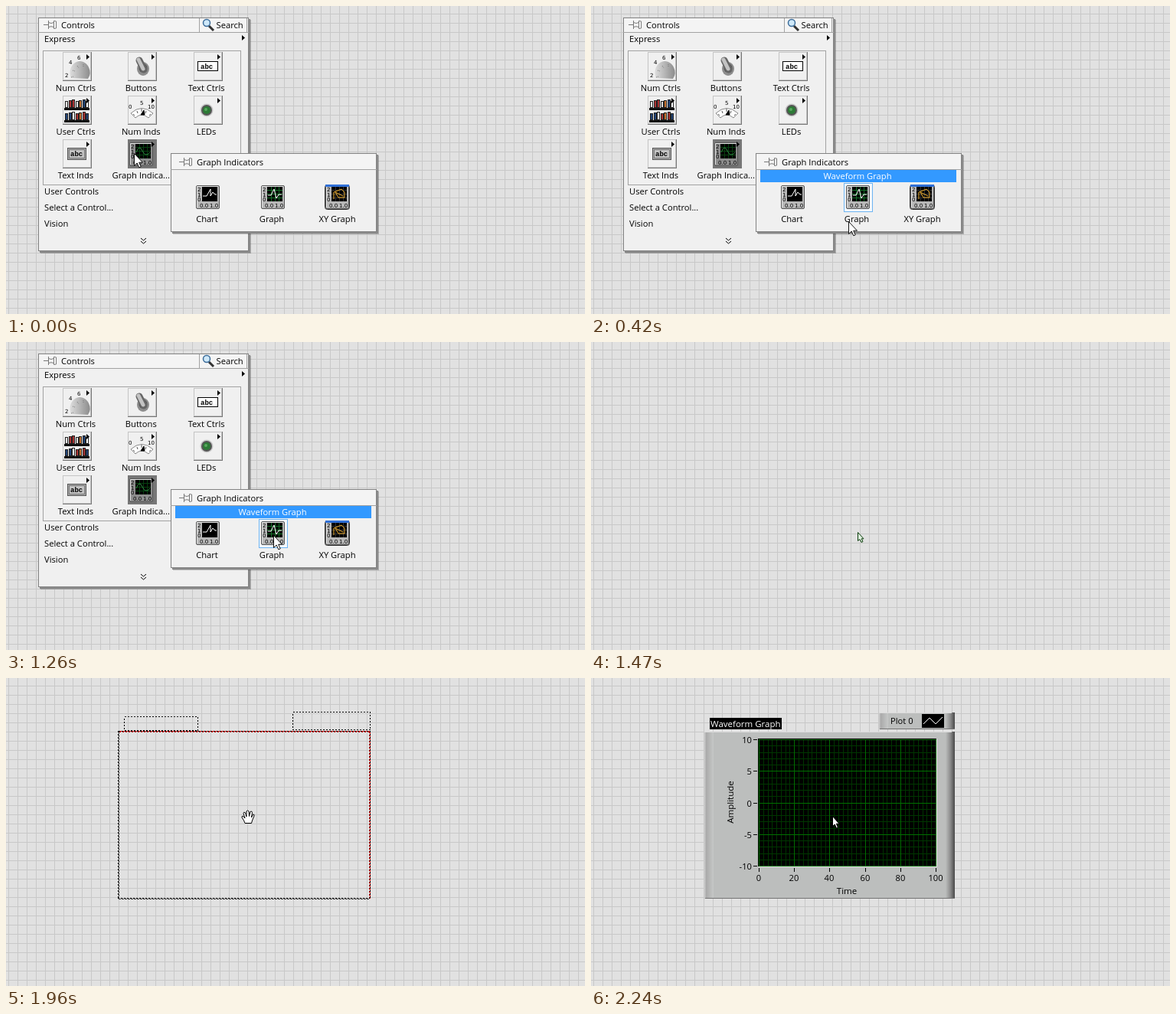
These frames come from a looping animation (756x402 px, 2660 ms). An HTML page:

```html
<!DOCTYPE html>
<html lang="en">
<head>
<meta charset="utf-8">
<title>Placing a waveform graph</title>
<style>
  html, body { margin: 0; width: 100%; height: 100%; overflow: hidden; background: #e1e1e1; }
  svg { display: block; width: 756px; height: 402px; }
  text { font: 11.2px "Open Sans", sans-serif; white-space: pre; }
  .crisp { shape-rendering: crispEdges; }
  .tiny { font: 7px "DejaVu Sans", sans-serif; }
  .mono { font: bold 9px "Liberation Mono", monospace; }
  .axis { font-size: 11.5px; }
</style>
</head>
<body>
<svg id="stage" viewBox="0 0 756 402"></svg>
<script>
const range = n => [...Array(n).keys()];
const rect = (x, y, w, h, fill, extra = '') =>
  `<rect class="crisp" x="${x}" y="${y}" width="${w}" height="${h}" fill="${fill}" ${extra}/>`;
const frame = (x, y, w, h, stroke, fill = 'none') =>
  rect(x + .5, y + .5, w - 1, h - 1, fill, `stroke="${stroke}"`);
const path = (d, stroke = '#000', fill = 'none', extra = '') =>
  `<path d="${d}" stroke="${stroke}" fill="${fill}" ${extra}/>`;
const text = (x, y, s, extra = '') => `<text x="${x}" y="${y}" ${extra}>${s}</text>`;
const mid = (x, y, s, extra = '') => text(x, y, s, `text-anchor="middle" ${extra}`);
const tiny = (x, y, s) => text(x, y, s, 'class="tiny"');
const at = (x, y, body) => `<g transform="translate(${x} ${y})">${body}</g>`;
const layer = (id, body) => `<g id="${id}">${body}</g>`;
const arrowRight = (x, y) => path(`M${x} ${y}v7l4-3.5z`, 'none', '#000');

// Windows and buttons
const panel = (x, y, w, h, sep) =>
  rect(x + 3, y + 3, w, h, '#000', 'opacity=".22"') + rect(x + 2, y + 2, w, h, '#8a8a8a') +
  frame(x, y, w, h, '#828282', '#f0f0f0') +
  rect(x + 1, y + 1, w - 2, sep - 1, '#f4f4f4') + rect(x, y + sep, w, 1, '#a2a2a2');
const pin = (x, y) => at(x, y,
  path('M0 6.5H6M6.5 1V12M6.5 3.5Q10 5.5 13.5 3.5M6.5 9.5Q10 8 13.5 9.5M13.5 1.5L16.5 2V11L13.5 11.5Z', '#777', '#fff'));
const button = (x, y, body) => at(x, y,
  rect(0, 0, 38, 38, '#777') + rect(0, 0, 37, 37, '#c4c4c4') + rect(1, 1, 35, 35, '#f0f0f0') +
  body + arrowRight(31, 3));

// Scope icon: bezel, axis digits, black screen with a trace
const scope = (screen, bezel = '#b8b8b8') =>
  `<rect x=".5" y=".5" width="30" height="30" rx="1.5" fill="${bezel}" stroke="#555"/>` +
  path('M1.5 29V1.5H29', '#e4e4e4') + rect(8, 2, 20, 19, '#000') +
  tiny(2, 8, '2') + tiny(2, 15, '1') + tiny(2, 21, '0') +
  tiny(5, 29, '0.0') + tiny(18, 29, '1.0') + screen;
const mesh = color => path('M13.5 2v19M18.5 2v19M23.5 2v19M8 6.5h20M8 11.5h20M8 16.5h20', color, 'none', 'class="crisp"');

const book = (x, base, h, color, w = 4) => frame(x, base - h, w, h, '#222', color);
const shelf = (base, colors) =>
  colors.map((c, i) => book(3 + i * 4.5, base, 9 + i % 3, c)).join('') + rect(2, base, 33, 3, '#111');

const icons = {
  knob: `<path d="M11 34A13 15 0 0 1 34 20Q38 28 33 35Z" fill="url(#metal)"/>` +
    path('M11 33l3-1M13 24l3 1M19 18l2 3M27 16v3', '#777', 'none', 'stroke-dasharray="1 1"') +
    tiny(3, 33, '2') + tiny(8, 16, '4') + tiny(19, 10, '6'),
  toggle: `<ellipse cx="20" cy="22" rx="8" ry="9" fill="#8d8d8d"/><ellipse cx="20" cy="21" rx="5.5" ry="6" fill="#555"/>` +
    path('M15 11L21 23', '#666', 'none', 'stroke-width="9" stroke-linecap="round"') +
    path('M14 10L20 22', '#c3c3c3', 'none', 'stroke-width="5" stroke-linecap="round"'),
  entry: frame(5, 12, 27, 13, '#000', '#fff') + text(9, 22, 'abc', 'class="mono"'),
  books: shelf(16, ['#fff', '#a33', '#a33', '#ddd', '#c73', '#247', '#fff']) +
    shelf(32, ['#247', '#247', '#fff', '#a33', '#c73', '#a33', '#247']),
  meter: path('M4 23Q18 10 33 23L27 29Q18 21 10 29Z', '#888', '#fff') +
    path('M7 24l2 2M12 20l1 3M18 17v4M24 20l-1 3M30 24l-2 2', '#555') +
    path('M21 19L17 25L22 25Z', '#000', '#000') +
    tiny(1, 17, '0') + tiny(16, 12, '5') + tiny(26, 17, '10'),
  led: '<circle cx="17" cy="19" r="8.5" fill="#c9c9c9"/><circle cx="17" cy="19" r="7" fill="#555"/>' +
    '<circle cx="17" cy="19" r="5" fill="#2c7a35"/><circle cx="16" cy="18" r="2" fill="#58a85e"/>',
  readout: frame(6, 11, 25, 16, '#555', '#aaa') + frame(8, 13, 21, 12, '#777', '#c4c4c4') +
    text(10, 22, 'abc', 'class="mono"'),
  graphs: rect(0, 0, 38, 38, '#777') + at(2, 4, scope(mesh('#073f10') + path('M9 13Q13 2 17 11T27 13', '#2d8540'), '#8d8d8d')),
};

const cells = [
  ['knob', 'Num Ctrls'], ['toggle', 'Buttons'], ['entry', 'Text Ctrls'],
  ['books', 'User Ctrls'], ['meter', 'Num Inds'], ['led', 'LEDs'],
  ['readout', 'Text Inds'], ['graphs', 'Graph Indica...'],
].map(([icon, label], i) => {
  const x = 74 + 85.3 * (i % 3), y = 60 + 57 * Math.floor(i / 3);
  return button(Math.round(x), y, icons[icon]) + mid(x + 17, y + 51, label);
}).join('');

const palette = panel(42, 15, 275, 305, 19) + pin(49, 18) + text(72, 29, 'Controls') +
  rect(252, 16, 1, 18, '#a2a2a2') + rect(314, 16, 1, 18, '#a2a2a2') +
  path('M265 26L271 32', '#333', 'none', 'stroke-width="3"') +
  '<circle cx="262" cy="22" r="4.5" fill="#cfe9fa" stroke="#3b6c9a" stroke-width="1.5"/>' +
  text(274.5, 29, 'Search') + text(50, 47, 'Express') + arrowRight(308, 38) +
  frame(48, 58, 259, 176, '#a2a2a2') + cells +
  text(50, 246, 'User Controls') + text(50, 267, 'Select a Control...') + text(50, 288, 'Vision') +
  path('M176 303l3.5 3l3.5-3M176 307l3.5 3l3.5-3');

const highlight = (id, x, label) => layer(id,
  rect(221, 214, 256, 16, '#3399ff') + mid(348, 226, label, 'fill="#fff"') +
  frame(x, 231, 38, 38, '#6db4f2', '#f4f8fc'));

const submenu = panel(215, 192, 269, 103, 21) + pin(226, 197) + text(249, 208, 'Graph Indicators') +
  highlight('chartHover', 245, 'Waveform Chart') + highlight('graphHover', 330, 'Waveform Graph') +
  at(248, 234, scope(path('M9 14H14L19 5V14L22 9L25 12H27', '#fff'))) +
  at(333, 234, scope(mesh('#16702a') + path('M9 13H13L17 5L20 17L23 12H27', '#fff'))) +
  at(417, 234, scope(mesh('#333') + path('M11 18V9L21 5L25 9V16H17L13 9L23 14', '#f0b030')) +
    '<rect x="-.5" y="-.5" width="32" height="32" rx="3" fill="none" stroke="#333"/>' + rect(0, -1, 31, 3, '#2f6fd6')) +
  mid(262.5, 282, 'Chart') + mid(347, 282, 'Graph') + mid(432.5, 282, 'XY Graph');

// Dragged outline
const dash = (d, color, gap = '2 2') => path(d, color, 'none', `class="crisp" stroke-dasharray="${gap}"`);
const outline = dash('M154.5 50.5H250.5V68.5H154.5Z', '#000') + dash('M374.5 44.5H475.5V67.5H374.5Z', '#000') +
  path('M147 69.5H475M475.5 69V288', '#f02020', 'none', 'class="crisp"') +
  dash('M147 69.5H475M475.5 69V288', '#000') +
  dash('M148 70.5H475M474.5 70V288', '#a00') +
  dash('M146.5 69V288M146 287.5H475', '#000') +
  path('M147.5 70V288M147 288.5H475', '#333', 'none', 'class="crisp" stroke-dasharray="3 1"');

// Placed graph
const slab = (x, y, w, h) => rect(x, y, w, h, '#bcbebd') +
  rect(x, y, 12, h, 'url(#bevelLeft)') + rect(x + w - 12, y, 12, h, 'url(#bevelRight)') +
  rect(x, y, w - 4, 1, '#dcdcdc') + rect(x + 1, y + h - 1, w - 1, 1, '#737373');
const plot = { x: 219, y: 80, w: 231, h: 165 };
const gridLines = (cols, rows, color) => path(
  range(cols + 1).map(i => `M${Math.round(plot.x + i * plot.w / cols) + .5} 80V246`).join('') +
  range(rows + 1).map(i => `M219 ${Math.round(plot.y + i * plot.h / rows) + .5}H451`).join(''),
  color, 'none', 'class="crisp"');
const ticks = range(5).map(i => {
  const y = Math.round(plot.y + i * plot.h / 4);
  return rect(212, y, 5, 1, '#000') + text(210, y + 4.5, 10 - 5 * i, 'text-anchor="end"');
}).join('') + range(6).map(i => {
  const x = Math.round(plot.x + i * plot.w / 5);
  return rect(x, 248, 1, 5, '#000') + mid(x, 265, 20 * i);
}).join('');
const graph = rect(155, 52, 94, 15, '#000') + text(156, 64, 'Waveform Graph', 'class="axis" fill="#fff"') +
  slab(376, 45, 99, 22) + text(391, 60, 'Plot 0') + rect(432, 47, 29, 18, '#000') +
  path('M434 60L442 52L450 60L459 51', '#fff') +
  slab(148, 70, 327, 218) + rect(218, 79, 234, 168, '#e0e0e0') + rect(218, 79, 233, 167, '#000') +
  gridLines(40, 20, '#003600') + gridLines(5, 4, '#006e00') + ticks +
  mid(334, 282, 'Time', 'class="axis"') +
  mid(0, 0, 'Amplitude', 'class="axis" transform="translate(186 162) rotate(-90)"');

// Pointers, each with its hot spot at 0,0
const pointers =
  layer('arrow', path('M.5 .5V16.5L4.2 13L6.8 18.8L9.2 17.8L6.7 12.2H11.5Z', '#111', '#fff')) +
  layer('smallArrow', path('M.5 .5V11.5L3 9.5L5 13.5L7 12.5L5.2 8.8H8Z', '#0b3d0b', '#dff0df')) +
  layer('finalArrow', path('M.5 .5V13.5L3.3 11L5.4 16L7.4 15L5.4 10.2H9Z', '#000', '#fff')) +
  layer('hand', path('M-4 8.5Q-5 5-8 1Q-8.5-1.5-6-.5L-4 2L-6-4.5Q-5.5-7-3.5-5L-2 0L-2-7Q-.5-9.5 1-7L1.5-.5L3-6.5Q5-8 5.5-5.5L4.5 1L6.5-3Q8.5-3.5 8-1L5.5 5L4.5 8.5Z', '#000', '#fff'));

document.getElementById('stage').innerHTML = `<defs>
  <pattern id="grid" x="3" y="10" width="12" height="12" patternUnits="userSpaceOnUse">
    ${rect(0, 0, 12, 12, '#e1e1e1') + rect(0, 0, 1, 12, '#c8c8c8') + rect(0, 0, 12, 1, '#c8c8c8')}
  </pattern>
  <linearGradient id="metal"><stop stop-color="#ddd"/><stop offset="1" stop-color="#8c8c8c"/></linearGradient>
  <linearGradient id="bevelLeft"><stop stop-color="#d2d2d2"/><stop offset=".2" stop-color="#aaa"/><stop offset="1" stop-color="#c6c8c7"/></linearGradient>
  <linearGradient id="bevelRight"><stop stop-color="#bcbebd"/><stop offset=".5" stop-color="#8e8e8e"/><stop offset="1" stop-color="#484848"/></linearGradient>
</defs>
<rect width="756" height="402" fill="url(#grid)"/>` +
  layer('menu', palette + submenu) + layer('outline', outline) + layer('graph', graph) + pointers;

// Steps: start time, pointer x, pointer y, pointer kind, visible layers
const over = ['menu', 'graphHover'];
const steps = [
  [0, 167, 192, 'arrow', ['menu']],
  [70, 205, 220, 'arrow', ['menu']],
  [140, 262, 258, 'arrow', ['menu', 'chartHover']],
  [210, 310, 286, 'arrow', over],
  [280, 320, 290, 'arrow', over],
  [350, 329, 288, 'arrow', over],
  [420, 336, 281, 'arrow', over],
  [490, 341, 273, 'arrow', over],
  [560, 344, 265, 'arrow', over],
  [630, 346, 257, 'arrow', over],
  [700, 348, 250, 'arrow', over],
  [770, 346, 257, 'arrow', over],
  [840, 344, 264, 'arrow', over],
  [980, 347, 253, 'arrow', over],
  [1120, 347, 254, 'arrow', over],
  [1260, 349, 252, 'arrow', over],
  [1470, 348, 248, 'smallArrow', []],
  [1540, 341, 229, 'hand', ['outline']],
  [1610, 337, 208, 'hand', ['outline']],
  [1680, 333, 190, 'hand', ['outline']],
  [1750, 328, 181, 'hand', ['outline']],
  [1890, 320, 181, 'hand', ['outline']],
  [1960, 316, 181, 'hand', ['outline']],
  [2170, 316, 181, 'hand', []],
  [2240, 315, 180, 'finalArrow', ['graph']],
];
const loop = 2660, grip = { x: 316, y: 181 };
const layers = Object.fromEntries([...document.querySelectorAll('g[id]')].map(g => [g.id, g]));
let shown;

function show(step) {
  if (step === shown) return;
  shown = step;
  const [, x, y, pointer, visible] = step;
  for (const [id, g] of Object.entries(layers))
    g.style.display = id === pointer || visible.includes(id) ? '' : 'none';
  layers[pointer].setAttribute('transform', `translate(${x} ${y})`);
  layers.outline.setAttribute('transform', `translate(${x - grip.x} ${y - grip.y})`);
}

const start = performance.now();
function tick() {
  const t = (performance.now() - start) % loop;
  show(steps.findLast(s => s[0] <= t));
  requestAnimationFrame(tick);
}
tick();
</script>
</body>
</html>
```
